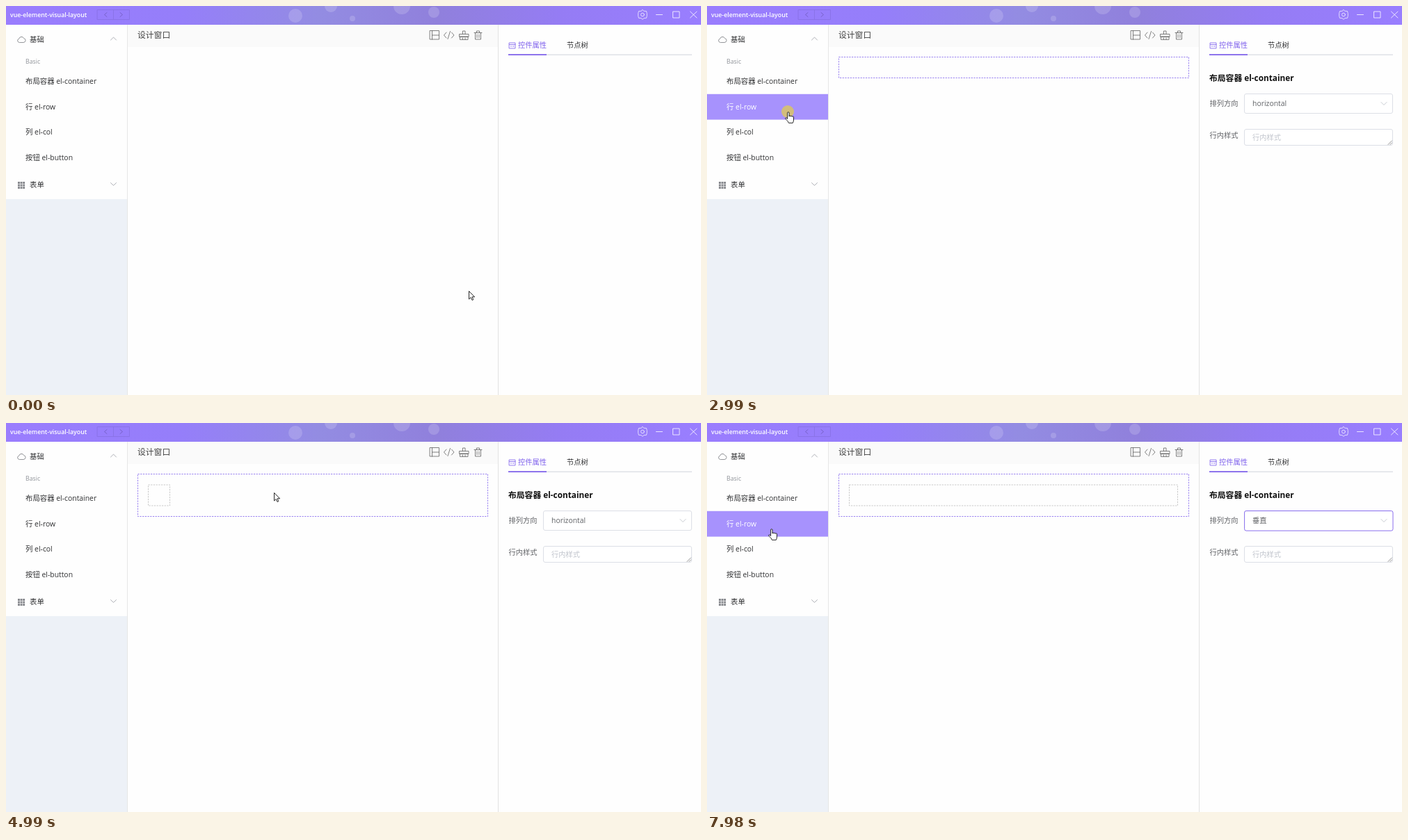
Write an HTML page that moves like this. It is 999 px wide and 560 px high and loops after 8 s.

```html
<!DOCTYPE html>
<html lang="zh-CN">
<head>
<meta charset="utf-8">
<title>vue-element-visual-layout</title>
<style>
  html, body { margin: 0; width: 100%; height: 100%; overflow: hidden; background: #fefefe; }
  svg { display: block; width: 999px; height: 560px; }
  text { font-family: "Open Sans", "Noto Sans CJK SC", "Noto Sans CJK", sans-serif; }
  .line { fill: none; stroke-linecap: round; stroke-linejoin: round; }
  [data-layer] { visibility: hidden; }
</style>
</head>
<body>
<svg id="stage" viewBox="0 0 999 560" xmlns="http://www.w3.org/2000/svg"></svg>
<script>
const INK = '#303133', GREY = '#606266', PALE = '#c0c4cc', EDGE = '#dcdfe6', ICON = '#606060';
const PURPLE = '#7d5fec', HOVER = '#a792fd';

// Markup helpers
const text = (x, cy, str, size = 10.4, fill = INK, extra = '') =>
  `<text x="${x}" y="${cy + size * 0.36}" font-size="${size}" fill="${fill}" ${extra}>${str}</text>`;
const rect = (x, y, w, h, fill, extra = '') =>
  `<rect x="${x}" y="${y}" width="${w}" height="${h}" fill="${fill}" ${extra}/>`;
const line = (d, color, width = 1, extra = '') =>
  `<path class="line" d="${d}" stroke="${color}" stroke-width="${width}" ${extra}/>`;
const dot = (x, y, r, fill, extra = '') => `<circle cx="${x}" cy="${y}" r="${r}" fill="${fill}" ${extra}/>`;
const layer = (name, ...parts) => `<g data-layer="${name}">${parts.join('')}</g>`;
const dashed = (x, y, w, h, color) =>
  rect(x + .5, y + .5, w - 1, h - 1, 'none', `stroke="${color}" stroke-width=".8" stroke-dasharray="2.2 1.5"`);
const chevron = (x, y, dir, color = PALE) =>
  line(`M${x - 4} ${y - 2 * dir}l4 ${4 * dir} 4 ${-4 * dir}`, color, .9);

// Title bar
function titleBar() {
  const bubbles = [[416, 14, 10], [467, 0, 9], [498, 18, 4], [569, 0, 12], [615, 9, 8]];
  return `<defs><linearGradient id="bar">
      <stop offset="0" stop-color="#9a7dfe"/><stop offset=".25" stop-color="#957efa"/>
      <stop offset=".45" stop-color="#938ce2"/><stop offset=".62" stop-color="#9080dc"/>
      <stop offset=".8" stop-color="#957cf4"/><stop offset="1" stop-color="#997eff"/>
    </linearGradient><clipPath id="barClip"><path d="M0 0H999V27H0z"/></clipPath></defs>` +
    rect(0, 0, 999, 27, 'url(#bar)') +
    `<g clip-path="url(#barClip)">${bubbles.map(b => dot(...b, '#fff', 'opacity=".17"')).join('')}</g>` +
    text(6, 13, 'vue-element-visual-layout', 8.8, '#fff', 'font-weight="600"') +
    line('M131.5 5.5h46v14h-46zM154.5 5.5v14', '#8a72e6', .9) +
    line('M145 9.500l-3.500 3 3.500 3M164 9.500l3.500 3-3.500 3', '#7560c6', .9) +
    line('M915 5.500l2 1.800 3.500.2.8 3.200v3.600l-.8 3-3.500.2-2 1.800-2-1.800-3.500-.2-.8-3v-3.600l.8-3.200 3.500-.2z', '#f4f0ff', .8) +
    `<circle class="line" cx="915" cy="12.500" r="2.400" stroke="#f4f0ff" stroke-width=".8"/>` +
    line('M934.5 12.500h9M959 8h9v9h-9zM983.500 8l9.500 9M993 8l-9.500 9', '#f4f0ff', .9);
}

// Left menu
const items = ['布局容器 el-container', '行 el-row', '列 el-col', '按钮 el-button'];
const rowTop = i => 90.2 + i * 36.6, itemY = i => rowTop(i) + 18.1;
const active = i => rect(0, rowTop(i), 174, 36.8, HOVER) + text(28, itemY(i), items[i], 10.4, '#fff');
const hover = i => layer('hover' + i, active(i));
const dragged = (i, dx, dy) =>
  layer('drag' + i, `<g transform="translate(${dx} ${dy})" opacity=".6">${active(i)}</g>`);

function sideMenu() {
  let cells = '';
  for (let i = 0; i < 9; i++) cells += rect(17 + i % 3 * 3.6, 253 + (i / 3 | 0) * 3.6, 2.9, 2.9, '#85878c');
  return rect(0, 27, 174, 533, '#edf1f7') + rect(0, 27, 174, 251, '#fefefe') +
    rect(174, 27, 1, 533, '#e6e6e6') +
    line('M19 52.500a2.700 2.700 0 0 1-.3-5.300 3.700 3.700 0 0 1 7-.6 3 3 0 0 1-.2 5.900z', '#85878c', .9) +
    text(34, 48, '基础') + chevron(154.5, 47, -1, '#a5a8ae') +
    text(28, 79.5, 'Basic', 8.8, '#909399') +
    items.map((s, i) => text(28, itemY(i), s)).join('') +
    cells + text(34, 257.5, '表单') + chevron(154.5, 256.5, 1, '#a5a8ae');
}

// Centre header and property tabs
function chrome() {
  return rect(175, 27, 532, 32, '#fafafa') + text(189, 42, '设计窗口', 11.8, '#444') +
    line('M609.5 35.500h13v12.500h-13zM612.500 35.500v12.500M612.500 42h10', ICON, .8) +
    line('M633 38l-3.500 4 3.500 4M640.500 38l3.500 4-3.500 4M638.500 36.500l-3.500 11', ICON, .8) +
    line('M652.500 48v-4h11.500v4zM651.500 44v-3.500h13.500v3.500zM656.500 40.500v-4.500h3.500v4.500M656.500 48v-2M660 48v-2', ICON, .8) +
    line('M673 38.500h11M676.500 38.500v-2.500h4v2.500M674.500 38.500v9.500h8v-9.500M677 41v4.500M680 41v4.500', ICON, .8) +
    rect(707, 27, 1, 533, '#e2e2e2') +
    rect(722, 69.5, 264, 1.5, '#e0e2e7') + rect(722, 69.3, 55, 1.7, PURPLE) +
    line('M723.500 53h8.500v8h-8.500zM723.500 55.500h8.500M725.500 58h1M728.500 58h1.500', PURPLE, .8) +
    text(736, 56.5, '控件属性', 10.25, PURPLE) + text(806, 56.5, '节点树', 10.25);
}

// Property form
const heading = str => text(722, 103.5, str, 11.8, '#111', 'font-weight="700"');
const label = (cy, str) => text(763.5, cy, str, 10.25, GREY, 'text-anchor="end"');
const box = (cy, color = EDGE, h = 29) =>
  rect(772.5, Math.round(cy - h / 2) + .5, 213, h - 1, '#fff', `rx="2.500" stroke="${color}"`);
const field = (cy, name, value, color) => label(cy, name) + box(cy) + text(784, cy, value, 10.4, color);
const select = (cy, name, value, color) => field(cy, name, value, color) + chevron(973, cy, 1);
const area = cy => label(cy - 2.5, '行内样式') + box(cy, EDGE, 24) + text(784, cy, '行内样式', 10.25, PALE) +
  line(`M979 ${cy + 10.5}l5.500-5.500M982 ${cy + 10.5}l2.500-2.500`, '#777', .8);

const containerForm = layer('container', heading(items[0]), label(140.5, '排列方向'), box(140.5),
  chevron(973, 140.5, 1), area(189));
const rowForm = layer('row', heading(items[1]),
  field(140.5, '文本', '内部文本内容', PALE),
  label(186, '栅格间隔'),
  rect(772.5, 171.5, 131, 29, '#f5f7fa', `rx="2.500" stroke="${EDGE}"`),
  rect(803, 172, 71, 28, '#fff'), line('M803 172v28M874 172v28', EDGE),
  text(838.5, 186, '0', 10.4, GREY, 'text-anchor="middle"'),
  line('M784.500 186h7', PALE), line('M885 186h7M888.500 182.500v7', GREY),
  select(231.5, '水平对齐', '水平对齐', PALE), select(277, '垂直对齐', '垂直对齐', PALE),
  field(322.5, '类型', 'flex', GREY), field(368, 'class', 'css类名', PALE), area(416));

const menu = layer('menu',
  rect(771, 166, 217, 60, '#000', 'opacity=".04" rx="3"'),
  rect(772.5, 164.5, 213, 59, '#fff', 'rx="3" stroke="#e4e7ed"'),
  `<path d="M794 165l4.500-4.500 4.500 4.500" fill="#fff" stroke="#e4e7ed"/>`,
  text(787, 181, '水平', 10.25, GREY), text(787, 206, '垂直', 10.25, GREY));

const frame = (name, h, color) => layer(name, dashed(189, 73, 504, h, color));
const slot = (name, w, color) => layer(name, dashed(204, 88.5, w, 31, color));

document.getElementById('stage').innerHTML = [
  rect(0, 0, 999, 560, '#fefefe'), titleBar(), sideMenu(), chrome(), hover(0), hover(1),
  frame('drop', 31, '#c0c0c0'), frame('low', 31, PURPLE),
  frame('tall', 62, PURPLE), frame('tallGrey', 62, '#c0c0c0'),
  slot('slot', 32, '#b8b8b8'), slot('slotOn', 32, '#808080'), slot('wide', 473, '#b8b8b8'),
  containerForm, rowForm,
  layer('focus', rect(772.6, 126.5, 213.4, 28.6, '#fff', `rx="2.500" stroke="${PURPLE}" stroke-width=".9"`),
    chevron(973, 140.5, 1)),
  layer('horizontal', text(784, 140.5, 'horizontal', 10.4, GREY)),
  layer('vertical', text(784, 140.5, '垂直', 10.25, GREY)),
  menu, dragged(0, 247, 52), dragged(1, 284, -52),
  layer('click', dot(116, 152, 9, '#d2bd7c')),
  layer('arrow', `<path d="M.5.5V12l2.700-2.500 1.800 4 1.800-.8-1.800-3.900h3.600z" fill="#fff" stroke="#111" stroke-width=".9"/>`),
  layer('hand', `<path d="M3.600 10.500V1.900a1.200 1.200 0 0 1 2.400 0V7q0-.9 1.100-.9t1.100 1q.1-.8 1.100-.8t1.100 1.100q.1-.6 1-.6 1.100 0 1.100 1.300V12q0 2-1.200 4.400H5.400Q4.600 13.600 1 10.600q-.8-1 .1-1.600 1-.5 2.500 1.500z" fill="#fff" stroke="#111" stroke-width=".9" stroke-linejoin="round"/>`)
].join('');

// Start time, pointer, x, y, visible layers
const LOOP = 8000;
const first = 'low container horizontal', rowOn = 'tallGrey slotOn row';
const nested = 'tall slot container horizontal', done = 'tall wide container vertical focus';
const steps = [
  [0, 'arrow', 665, 410, ''],
  [500, 'hand', 103, 107, 'hover0'],
  [990, 'hand', 103, 107, 'hover0'],
  [1490, 'arrow', 355, 159, 'hover0 drop drag0'],
  [2000, 'arrow', 362, 158, first],
  [2490, 'hand', 121, 155, first + ' hover1'],
  [2990, 'hand', 112, 152, first + ' hover1 click'],
  [3460, 'arrow', 400, 100, nested + ' hover1 drag1'],
  [3980, 'arrow', 400, 100, rowOn],
  [4480, 'arrow', 284, 106, rowOn],
  [4990, 'arrow', 385, 100, nested],
  [5490, 'hand', 965, 131, nested],
  [5980, 'hand', 818, 184, nested + ' focus menu'],
  [6490, 'hand', 821, 212, nested + ' focus menu'],
  [6980, 'arrow', 234, 171, done],
  [7480, 'hand', 90, 155, done + ' hover1'],
  [7980, 'hand', 88, 152, done + ' hover1']
];

const layers = {};
document.querySelectorAll('[data-layer]').forEach(g => layers[g.dataset.layer] = g);
let shown = null;

function draw(now) {
  const t = now % LOOP;
  const step = steps.findLast(s => s[0] <= t);
  if (step !== shown) {
    shown = step;
    const [start, pointer, x, y, names] = step;
    const on = new Set([pointer, ...names.split(' ')]);
    for (const name in layers) layers[name].style.visibility = on.has(name) ? 'visible' : 'hidden';
    layers[pointer].setAttribute('transform', `translate(${x} ${y})`);
    layers.hover0.style.opacity = start === 500 ? .5 : 1;
  }
  requestAnimationFrame(() => draw(performance.now() - begin));
}
const begin = performance.now();
draw(0);
</script>
</body>
</html>
```
